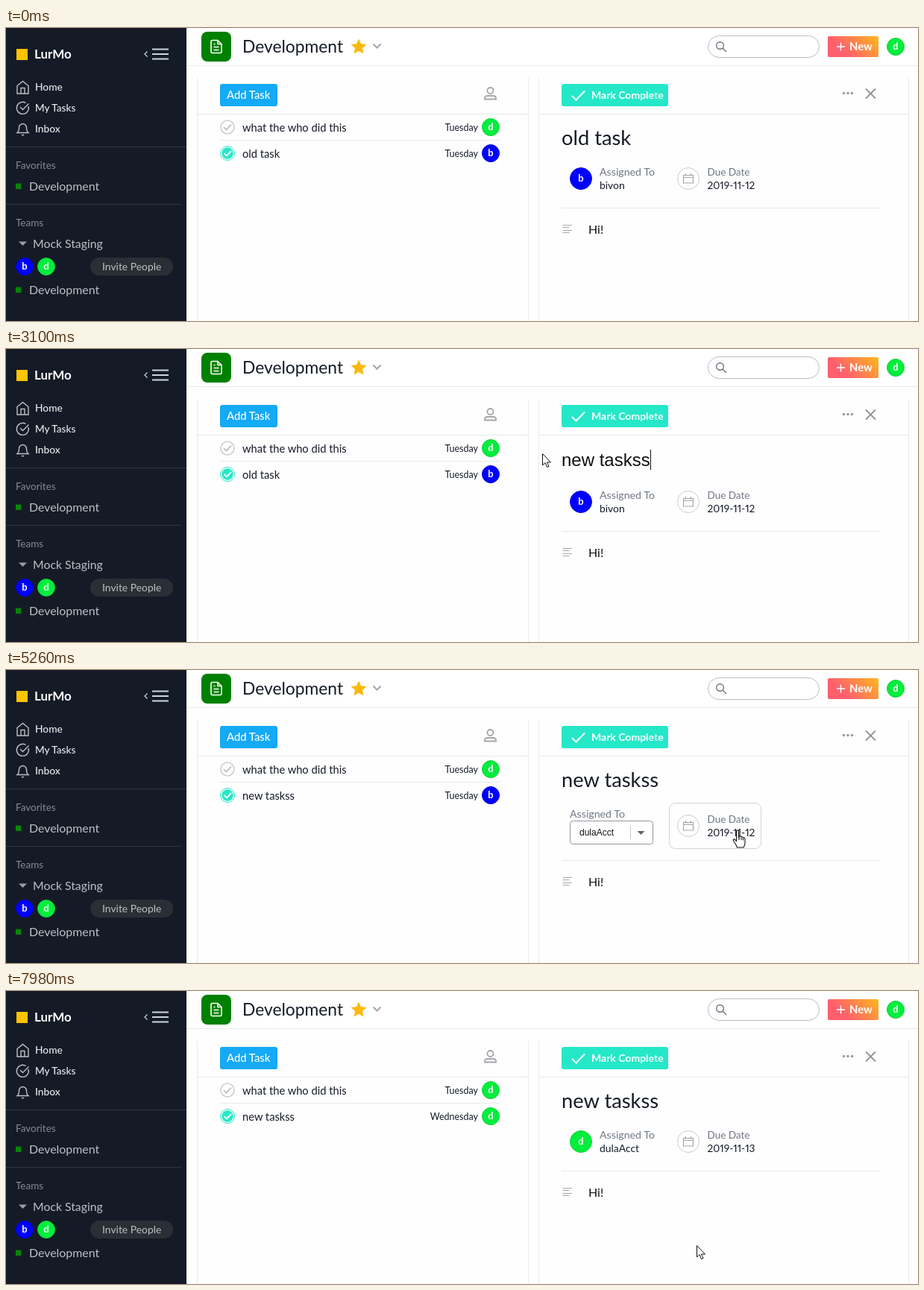
An HTML page for the animation above (8 s loop, 1223 by 393 pixels).

```html
<!DOCTYPE html>
<html lang="en">
<head>
<meta charset="utf-8">
<title>Task board</title>
<style>
  html, body { margin: 0; width: 100%; height: 100%; overflow: hidden; background: #fefefe; }
  svg { display: block; font-family: Lato, sans-serif; white-space: pre; }
  .ui { font-family: "Liberation Sans", Arial, sans-serif; }
  .mono { font-family: "Liberation Mono", monospace; }
</style>
</head>
<body>
<svg id="stage" width="1223" height="393" viewBox="0 0 1223 393">
  <defs>
    <linearGradient id="warm" gradientUnits="userSpaceOnUse" x1="1112" y1="49" x2="1160" y2="1">
      <stop offset=".3" stop-color="#ff5f6d"/><stop offset="1" stop-color="#ffb81c"/>
    </linearGradient>
  </defs>
  <g id="fixed"></g>
  <g id="live"></g>
</svg>
<script>
const LOOP = 8000, INK = '#151b26', GREY = '#6f7782', LINE = '#e8e9ea', TEAL = '#25e8c8';
const BLUE = '#0000ff', GREEN = '#00ee3c';
const users = { b: 'bivon', d: 'dulaAcct' };
const $ = id => document.getElementById(id);

const text = (x, y, s, size, fill = INK, more = '') =>
  `<text x="${x}" y="${y}" font-size="${size}" fill="${fill}" ${more}>${s}</text>`;
const rect = (x, y, w, h, fill, rx = 0, more = '') =>
  `<rect x="${x}" y="${y}" width="${w}" height="${h}" rx="${rx}" fill="${fill}" ${more}/>`;
const frame = (x, y, w, h, rx, color = '#d0d3d6', fill = 'none') =>
  rect(x + .5, y + .5, w, h, fill, rx, `stroke="${color}"`);
const path = (d, color, width = 1, fill = 'none') =>
  `<path d="${d}" stroke="${color}" stroke-width="${width}" fill="${fill}"/>`;
const disc = (x, y, r, fill, more = '') => `<circle cx="${x}" cy="${y}" r="${r}" fill="${fill}" ${more}/>`;
const avatar = (x, y, who, r = 12) =>
  disc(x, y, r - .5, who === 'b' ? BLUE : GREEN, `stroke="${who === 'b' ? '#0000e0' : '#14cf3e'}"`) +
  text(x, y + 4, who, 13, '#fff', 'text-anchor="middle" font-weight="700"');
const MED = 'font-weight="500"', UI = 'class="ui"', MONO = 'class="mono"';

function sidebar() {
  const pale = '#e9ebee', dim = '#858a92', soft = '#bdc0c4';
  return rect(0, 0, 242, 393, INK) + rect(14, 28, 15, 15, '#ffc400') +
    text(38, 41, 'LurMo', 17, '#fff', 'font-weight="700"') +
    path('M189.500 31.500l-3.500 3.500l3.500 3.500', '#cdd6dc', 1.2) +
    path('M196 28.500h22M196 35h22M196 41.500h22', '#cdd6dc', 2) +
    path('M15 77.500l7.500-6l7.500 6v10.500h-15zM20 88v-7.500h5v7.500', soft, 1.4) +
    path('M30 105a8 8 0 1 1-3.500-4.500M19 106l3.500 3.500l8-8', soft, 1.4) +
    path('M15 140.500q2.500-2 2.500-7a5 5 0 0 1 10 0q0 5 2.500 7zM21 143q1.500 1.500 3 0', soft, 1.4) +
    text(39, 84, 'Home', 13.8, pale, MED) + text(39, 112, 'My Tasks', 13.6, pale, MED) +
    text(39, 140, 'Inbox', 13.8, pale, MED) +
    path('M0 159.500h242M0 236.500h235', '#30363f') +
    text(13, 189, 'Favorites', 13.5, dim) + text(13, 266, 'Teams', 13.5, dim) +
    [[208.500, 218], [347.500, 357]].map(([box, base]) =>
      rect(13, box, 7.500, 7.500, '#078207') + text(31, base, 'Development', 15.9, soft)).join('') +
    path('M17 286.500h11l-5.500 5.500z', 'none', 0, '#9a9ea4') + text(36, 295, 'Mock Staging', 15.8, soft) +
    avatar(25, 320, 'b') + avatar(54, 320, 'd') +
    rect(113, 308, 111, 24, '#2a2f36', 12) + text(129, 325, 'Invite People', 13.9, soft);
}

function header() {
  const star = Array.from({ length: 10 }, (_, i) => {
    const a = i * Math.PI / 5, r = i % 2 ? 5.2 : 11;
    return `${473 + r * Math.sin(a)},${25.5 - r * Math.cos(a)}`;
  });
  return rect(242, 0, 981, 50, '#fff') + path('M242 50.500H1223', LINE) +
    rect(262, 5, 40, 40, '#008000', 8) +
    path('M284 16.500h-7.500q-1.500 0-1.500 1.500v14q0 1.500 1.500 1.500h11q1.500 0 1.500-1.500V21.500zv5h5M278.500 25.500h7M278.500 29.500h7M278.500 21.500h2', '#fff', 1.6) +
    text(317, 33, 'Development', 22.8) + `<polygon points="${star.join(' ')}" fill="#fbb90c"/>` +
    path('M492.500 21.500l5 5l5-5', '#a3a6aa', 2) +
    frame(941, 10, 149, 29, 15, '#b7bec7', '#fff') +
    disc(957.500, 23.500, 4.800, 'none', 'stroke="#6b7280" stroke-width="1.4"') + path('M961 27l5 5', '#6b7280', 1.4) +
    rect(1102, 11, 68, 28, 'url(#warm)', 2) + path('M1114 25h11M1119.500 19.500v11', '#fff', 1.5) +
    text(1131, 30, 'New', 14.8, '#fff', 'font-weight="700"') + avatar(1193, 25, 'd');
}

function columns() {
  return path('M256.500 67V393M700.500 67V393M714.500 67V393M1210.500 67V393M257 115.500H700M715 115.500H1210M287 150.500H662', LINE) +
    rect(287, 75, 77, 30, '#14aaf5', 3) + text(296, 95, 'Add Task', 14.8, '#fff', MED) +
    disc(649.500, 84, 4, 'none', 'stroke="#a3a6aa" stroke-width="1.8"') +
    path('M642 95.500v-1.500q0-3 4-3h7q4 0 4 3v1.500z', '#a3a6aa', 1.8) +
    disc(297, 133, 9, 'none', 'stroke="#cbced1" stroke-width="1.6"') +
    path('M292 133l3.500 3.500l6.500-7', '#b8bbbe', 1.7) +
    disc(297, 168, 9.500, '#fff', `stroke="${TEAL}"`) + disc(297, 168, 7.700, TEAL) +
    path('M292.500 168l3.500 3.500l6-6.500', '#fff', 1.9) +
    text(317, 139, 'what the who did this', 14.7) + text(633, 138, 'Tuesday', 12.5, INK, 'text-anchor="end"') +
    avatar(650, 133, 'd') +
    rect(745, 75, 143, 30, TEAL, 3) + path('M759 91l5.500 5.500L776 84.500', '#fff', 2) +
    text(785, 95, 'Mark Complete', 14, '#fff', 'font-weight="700"') +
    [1123.500, 1129, 1134.500].map(x => disc(x, 87.500, 1.700, '#96999d')).join('') +
    path('M1153 81.500l13 13M1166 81.500l-13 13', '#909397', 1.8);
}

// Pointer stops: time, x, y. It eases from one stop to the next.
const stops = [
  [200, 905, 367], [470, 830, 152], [700, 830, 152], [950, 857, 153], [1000, 857, 153], [1250, 719, 140],
  [3400, 719, 140], [3620, 840, 213], [3780, 842, 215], [4080, 842, 215], [4450, 858, 249],
  [4790, 858, 249], [5240, 981, 216], [5610, 981, 216], [5920, 1065, 205], [6490, 1065, 205],
  [6900, 1066, 347], [7290, 1066, 347], [7480, 1039, 349], [7800, 1039, 349], [7980, 926, 341]
];
const within = (t, ...spans) => spans.some(([a, b]) => t >= a && t < b);

function pointerAt(t) {
  const i = stops.findIndex(s => s[0] > t);
  if (i < 0) return stops.at(-1).slice(1);
  const [a, b] = [stops[i - 1] || stops[0], stops[i]];
  const k = Math.max(0, (t - a[0]) / (b[0] - a[0] || 1)), e = k * k * (3 - 2 * k);
  return [1, 2].map(j => Math.round(a[j] + (b[j] - a[j]) * e));
}

function pointer(t, x, y) {
  if (t < 200) return '';
  const pressed = within(t, [640, 720], [940, 1230], [3620, 3700], [4000, 4080], [4590, 4680],
    [5400, 5500], [6120, 6230], [6950, 7040], [7490, 7560]);
  const beam = within(t, [400, 1210]), hand = within(t, [3520, 3700], [4970, 5580]);
  const shape = beam
    ? path('M-3-7.500h2.500l.500.500l.500-.500h2.500M0-7v14M-3 7.500h2.500l.500-.500l.500.500h2.500', '#222', 1.2)
    : hand
    ? path('M-1.500 0q1.500-2 3 0v8l1-1q2-.500 2.500 1q2-.500 2.500 1q2.500-.500 2.500 2v5q0 3-2 6H-.500Q-2 18-5.500 13q-1-2.500 1.500-2l2.500 2.500zM2 8v4M5 9v3M7.500 10v2.500', '#111', 1.1, '#fff')
    : path('M.500 .500v15.500l3.500-3.500l2.500 6l2.500-1l-2.500-5.500h5z', '#111', 1, '#fff');
  return (pressed ? disc(x - 2, y, 12, '#ffff66', 'opacity=".9"') : '') +
    `<g transform="translate(${x} ${y})">${shape}</g>`;
}

const pen = document.createElement('canvas').getContext('2d');
const inputWidth = s => {
  pen.font = '24px "Liberation Sans", Arial, sans-serif';
  return pen.measureText(s).width;
};

function title(t, x) {
  const hover = within(t, [380, 1215], [3425, 3500]);
  const box = hover ? frame(735, 126, 436, t < 640 ? 41 : 44, 4, '#cfd2d5', '#fff') : '';
  if (t < 640 || t >= 3620) return box + text(745, 157, t < 640 ? 'old task' : 'new taskss', 27.3);
  const typed = Math.min(8, 1 + Math.floor((t - 1910) / 71.4)) + (t >= 2970) + (t >= 3100);
  const value = t < 1910 ? 'old task' : 'new taskss'.slice(0, typed);
  const end = 745 + inputWidth(value);
  if (t > 1010 && t < 1910) {
    let n = value.length;
    while (n && 745 + inputWidth(value.slice(0, n)) > x) n--;
    const start = 745 + inputWidth(value.slice(0, n));
    return box + rect(start, 135, end - start, 27, '#3390ff') +
      text(745, 157, `${value.slice(0, n)}<tspan fill="#fff">${value.slice(n)}</tspan>`, 24, '#111', UI);
  }
  const caret = within(t, [2770, 2970]) ? '' : rect(Math.round(end), 135, 1, 27, '#111');
  return box + text(745, 157, value, 24, '#111', UI) + caret;
}

function assignee(t, mode, shift) {
  const hover = within(t, [3510, 4900]);
  if (mode !== 'select') {
    const who = t < 5400 ? 'b' : 'd';
    return (hover ? frame(745, 178, 133, 50, 8) : '') + avatar(771, 202 + shift, who, 15) +
      text(796, 198 + shift, 'Assigned To', 14.2, GREY) + text(796, 216 + shift, users[who], 13.9);
  }
  return (hover ? frame(745, 178, 133, 61, 8) : '') + text(756, 198, 'Assigned To', 14.2, GREY) +
    frame(756, 202, 111, 31, 4, '#92969a', '#fff') +
    text(769, 222, users[t < 4650 ? 'b' : 'd'], 12, '#111', UI) +
    path('M837.500 209v18', '#c5c8cb') + path('M846.500 216h10l-5 5z', 'none', 0, '#666');
}

function menu(t, y) {
  if (!within(t, [4100, 4650])) return '';
  const over = y > 243 ? 1 : 0;
  return frame(756, 234, 111, 33, 0, '#777', '#fff') + ['b', 'd'].map((who, i) =>
    rect(757, 235 + i * 16, 110, 16, i === over ? '#1e90ff' : '#fff') +
    text(769, 247 + i * 16, users[who], 12, i === over ? '#fff' : '#111', UI)).join('');
}

function dueDate(t, mode, x) {
  const label = { view: 0, title: 3, select: 7, date: 0 }[mode];
  const icon = mode === 'date' ? 2 : label;
  const editing = mode === 'date';
  const hover = within(t, [4970, 6620]);
  const day = t < 7000 ? 12 : 13;
  let out = hover ? frame(889, 178, editing ? 189 : 123, editing ? 50 : 61, 8) : '';
  out += disc(915, 202 + icon, 14.5, '#fff', 'stroke="#c9cccf"') +
    `<g transform="translate(0 ${icon})">${path('M908.500 197.500h13v10.500h-13zM908.500 200.500h13M911.500 195v3.500M918.500 195v3.500', '#a3a6aa', 1.2)}</g>` +
    text(940.500, 198 + label, 'Due Date', 13.5, GREY);
  if (!editing) {
    return out + text(940.500, 216 + label, `2019-11-${day}`, 13.7, INK, 'style="font-variant-numeric:proportional-nums"');
  }
  return out + frame(940, 202, 127, 20, 0, '#a9a9a9', '#fff') +
    (t < 7000 ? rect(943, 205, 17, 16, '#a8caf8') : '') +
    text(944, 217, `11/${day}/2019`, 13.33, '#111', MONO) +
    path('M1040 210l7 7M1047 210l-7 7', '#345a9c', 2) +
    (within(t, [5850, 6550]) ? rect(1049, 204, 17, 17, '#e4e4e4') : '') +
    path('M1053 209h9l-4.500 7z', 'none', 0, '#111');
}

function calendar(t, x, y) {
  if (!within(t, [6290, 7000])) return '';
  let out = frame(940, 224, 261, 190, 0, '#a9a9a9', '#fff') +
    text(954, 247, 'November 2019', 13, '#222', UI) + path('M1050 240h8l-4 5z', 'none', 0, '#333') +
    path('M1136 238v9l-6-4.500zM1184 238v9l6-4.500z', 'none', 0, '#555') + disc(1160, 242.500, 3, '#555') +
    rect(952, 261, 238, 22, '#f1f1f1');
  const cell = (col, cy, s, fill) => text(969 + col * 34, cy, s, 12, fill, UI + ' text-anchor="middle"');
  [...'SMTWTFS'].forEach((s, i) => out += cell(i, 276, s, '#666'));
  for (let i = 0; i < 35; i++) {
    const col = i % 7, top = 285 + Math.floor(i / 7) * 25, left = 952 + col * 34;
    const date = new Date(2019, 9, 27 + i);
    const over = x >= left && x < left + 34 && y >= top && y < top + 25;
    if (i === 16 || over) out += rect(left, top, 34, 25, over ? '#d4e5fc' : '#bcd5f8');
    out += cell(col, top + 17, date.getDate(), date.getMonth() === 10 ? '#222' : '#aaa');
  }
  return out + frame(952, 261, 238, 149, 0, '#ccc');
}

function draw(t) {
  const [x, y] = pointerAt(t);
  const mode = within(t, [640, 3620]) ? 'title' : within(t, [3680, 5400]) ? 'select' :
    within(t, [5400, 7500]) ? 'date' : 'view';
  const shift = { view: 0, title: 3, select: 14, date: 3 }[mode];
  $('live').innerHTML =
    text(317, 174, t < 3640 ? 'old task' : 'new taskss', 14.7) +
    text(633, 173, t < 7860 ? 'Tuesday' : 'Wednesday', 12.5, INK, 'text-anchor="end"') +
    avatar(650, 168, t < 5400 ? 'b' : 'd') +
    title(t, x) + assignee(t, mode, mode === 'date' ? 2 : shift) + dueDate(t, mode, x) +
    `<g transform="translate(0 ${shift})">` +
      path('M745 241.500H1172', LINE) +
      path('M746.500 264.500h12.500M746.500 267.500h9M746.500 271.500h12.500M746.500 274.500h9', '#a3a6aa') +
      text(781, 276, 'Hi!', 16, '#111') +
    '</g>' + menu(t, y) + calendar(t, x, y) + pointer(t, x, y);
}

$('fixed').innerHTML = sidebar() + header() + columns();
const began = performance.now();
(function tick() {
  draw((performance.now() - began) % LOOP);
  requestAnimationFrame(tick);
})();
</script>
</body>
</html>
```
